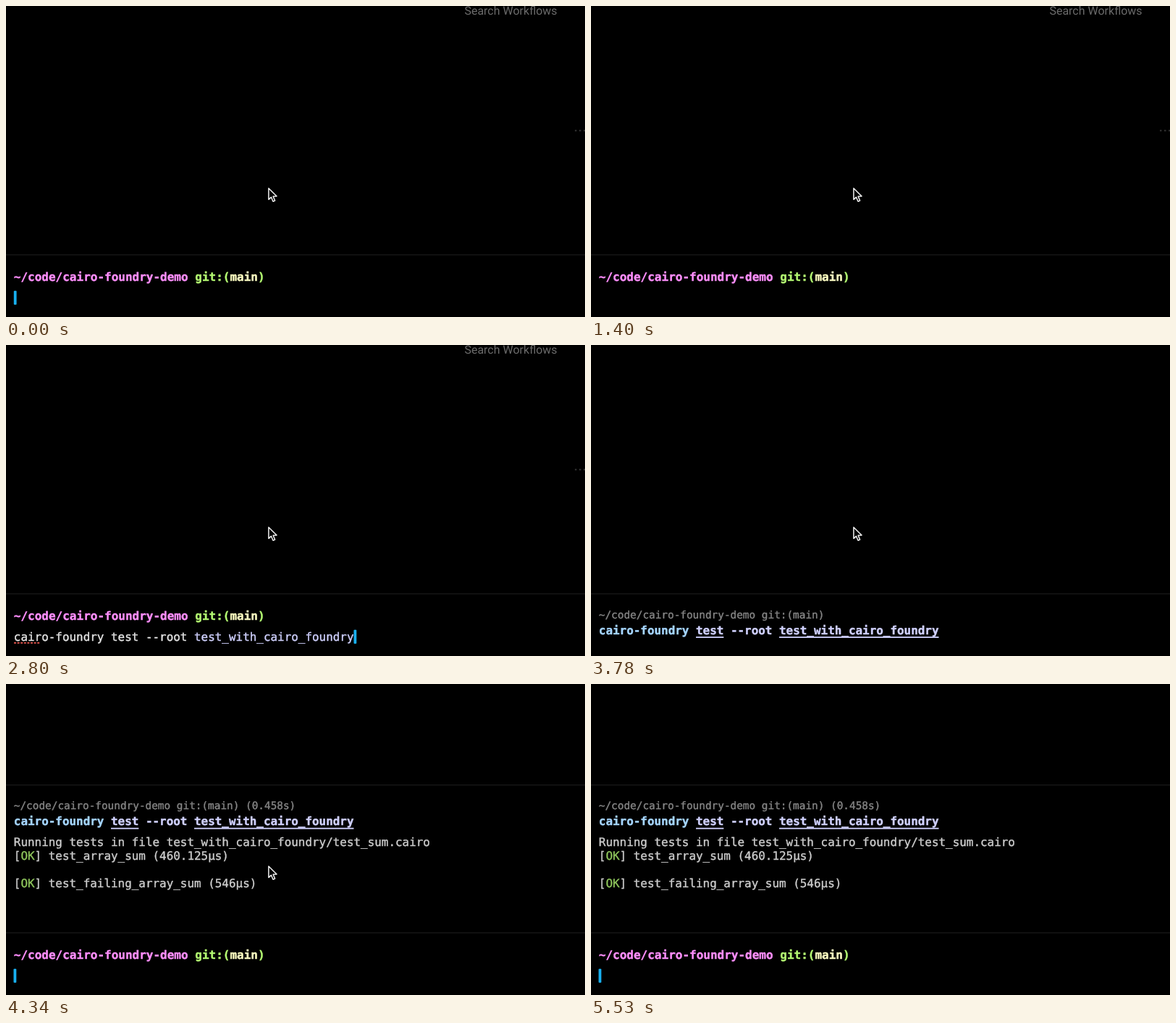
An HTML page with a canvas that plays this animation: 800x430 px, repeating every 5600 ms.

```html
<!DOCTYPE html>
<html lang="en">
<head>
<meta charset="utf-8">
<title>Terminal test run</title>
<style>
  html, body { margin: 0; width: 100%; height: 100%; overflow: hidden; background: #000; }
  canvas { display: block; }
</style>
</head>
<body>
<canvas id="stage" width="800" height="430"></canvas>
<script>
const ctx = document.getElementById('stage').getContext('2d');
const LOOP = 5600, STEP = 70;
const LEFT = 10.8, SIZE = 15.93, SMALL = 14.38, PROMPT = 16;
const MONO = '"DejaVu Sans Mono", monospace';
const PATH = '~/code/cairo-foundry-demo';
const TOOL = 'cairo-foundry', ARG = 'test_with_cairo_foundry';
const COMMAND = `${TOOL} test --root ${ARG}`;

const C = {
  pink: '#ff8ffd', green: '#b4fa72', yellow: '#feffc2', blue: '#a5d5fe',
  lavender: '#d0d1fe', text: '#cccccc', input: '#e6e6e6', dim: '#858585',
  ok: '#8fc65c', ghost: '#555555', caret: '#18b0f0', line: '#191919'
};

const T = {
  keys: [1540, 1750, 1960, 2170], squiggle: 2450, accept: 2730, checked: 3500,
  submit: 3780, output: 4130, done: 4270
};
const CARET_OFF = [[350, 910], [1400, 1540], [3500, 3780], [4970, 5530]];

// Mouse path: time, x, y
const MOUSE = [[4480, 362, 251], [4900, 456, 65], [4970, 482, 24], [5110, 545, -25]];
const ARROW = [[0.9, 1], [0.9, 16.6], [4.4, 13.2], [7, 19.2], [9.6, 18.1], [7.1, 12.2], [12, 12]];

// Draws coloured runs on one line, slightly thickened; returns the end of each run.
function write(runs, y, { size = SIZE, bold = false, x = LEFT } = {}) {
  ctx.font = `${bold ? 'bold ' : ''}${size}px ${MONO}`;
  ctx.lineWidth = 0.4;
  ctx.lineJoin = 'round';
  return runs.map(([text, color]) => {
    ctx.fillStyle = ctx.strokeStyle = color;
    ctx.fillText(text, x, y);
    ctx.strokeText(text, x, y);
    return x += ctx.measureText(text).width;
  });
}

function rule(y) {
  ctx.fillStyle = C.line;
  ctx.fillRect(0, y, 800, 1.3);
}

function drawCaret(t, x) {
  if (CARET_OFF.some(([a, b]) => t >= a && t < b)) return;
  ctx.fillStyle = C.caret;
  ctx.beginPath();
  ctx.roundRect(x, 393.8, 3.8, 19.2, 1);
  ctx.fill();
}

function drawPrompt() {
  rule(343.4);
  write([[PATH, C.pink], [' git:(', C.green], ['main', C.yellow], [')', C.green]], 379.7,
    { size: PROMPT, bold: true });
}

function drawInput(t) {
  const y = 408.9;
  const count = T.keys.filter(k => t >= k).length;
  let end = LEFT;
  if (t >= T.accept) {
    end = write([[`${TOOL} test --root `, C.input], [ARG, C.lavender]], y)[1];
  } else if (count) {
    end = write([[COMMAND.slice(0, count), C.input], [COMMAND.slice(count), C.ghost]], y)[0];
  }
  if (t >= T.squiggle && t < T.checked) {
    ctx.fillStyle = '#e4574f';
    for (let x = 11; x < 47; x += 4.6) ctx.fillRect(x, 411, 3, 1.8);
  }
  drawCaret(t, end);
}

function drawIdleHints() {
  ctx.font = '16px Roboto, sans-serif';
  ctx.fillStyle = '#6a6a6a';
  ctx.fillText('Search Workflows', 633.4, 12);
  ctx.fillStyle = '#333333';
  for (let x = 786; x < 800; x += 6) ctx.fillRect(x, 171.3, 2.5, 2);
}

function drawBlock(t) {
  const top = t >= T.done ? 139 : t >= T.output ? 226 : 343.4;
  rule(top);
  const time = t >= T.done ? ' (0.458s)' : '';
  write([[`${PATH} git:(main)${time}`, C.dim]], top + 34.3, { size: SMALL });
  const ends = write([
    [TOOL + ' ', C.blue], ['test', C.lavender], [' --root ', C.lavender], [ARG, C.lavender]
  ], top + 56.4, { bold: true });
  ctx.fillStyle = C.lavender;
  for (const i of [1, 3]) ctx.fillRect(ends[i - 1], top + 59.8, ends[i] - ends[i - 1], 1.8);

  if (t < T.output) return;
  const result = (text, dy) => write([['[', C.text], ['OK', C.ok], ['] ' + text, C.text]], top + dy);
  write([[`Running tests in file ${ARG}/test_sum.cairo`, C.text]], top + 85);
  result('test_array_sum (460.125µs)', 104.2);
  result('test_failing_array_sum (546µs)', 142.4);
}

function mouseAt(t) {
  if (t <= MOUSE[0][0]) return MOUSE[0].slice(1);
  const i = MOUSE.findIndex(p => t < p[0]);
  if (i < 0) return null;
  const [t0, x0, y0] = MOUSE[i - 1], [t1, x1, y1] = MOUSE[i];
  let u = (t - t0) / (t1 - t0);
  if (i === 1) u = Math.pow(u, 1.4);
  return [x0 + (x1 - x0) * u, y0 + (y1 - y0) * u];
}

function drawMouse(t) {
  const pos = mouseAt(t);
  if (!pos) return;
  ctx.save();
  ctx.translate(pos[0], pos[1]);
  ctx.beginPath();
  ARROW.forEach(([x, y]) => ctx.lineTo(x, y));
  ctx.closePath();
  ctx.fillStyle = '#000';
  ctx.fill();
  ctx.strokeStyle = '#f2f2f2';
  ctx.lineWidth = 1.5;
  ctx.lineJoin = 'round';
  ctx.stroke();
  ctx.restore();
}

function draw(t) {
  ctx.fillStyle = '#000';
  ctx.fillRect(0, 0, 800, 430);
  ctx.textRendering = 'geometricPrecision';
  if (t < T.submit) {
    drawIdleHints();
    drawPrompt();
    drawInput(t);
  } else {
    drawBlock(t);
    if (t >= T.done) {
      drawPrompt();
      drawCaret(t, LEFT - 0.3);
    }
  }
  drawMouse(t);
}

const start = performance.now();
function tick() {
  const t = (performance.now() - start) % LOOP;
  draw(Math.floor(t / STEP) * STEP);
  requestAnimationFrame(tick);
}
tick();
</script>
</body>
</html>
```
